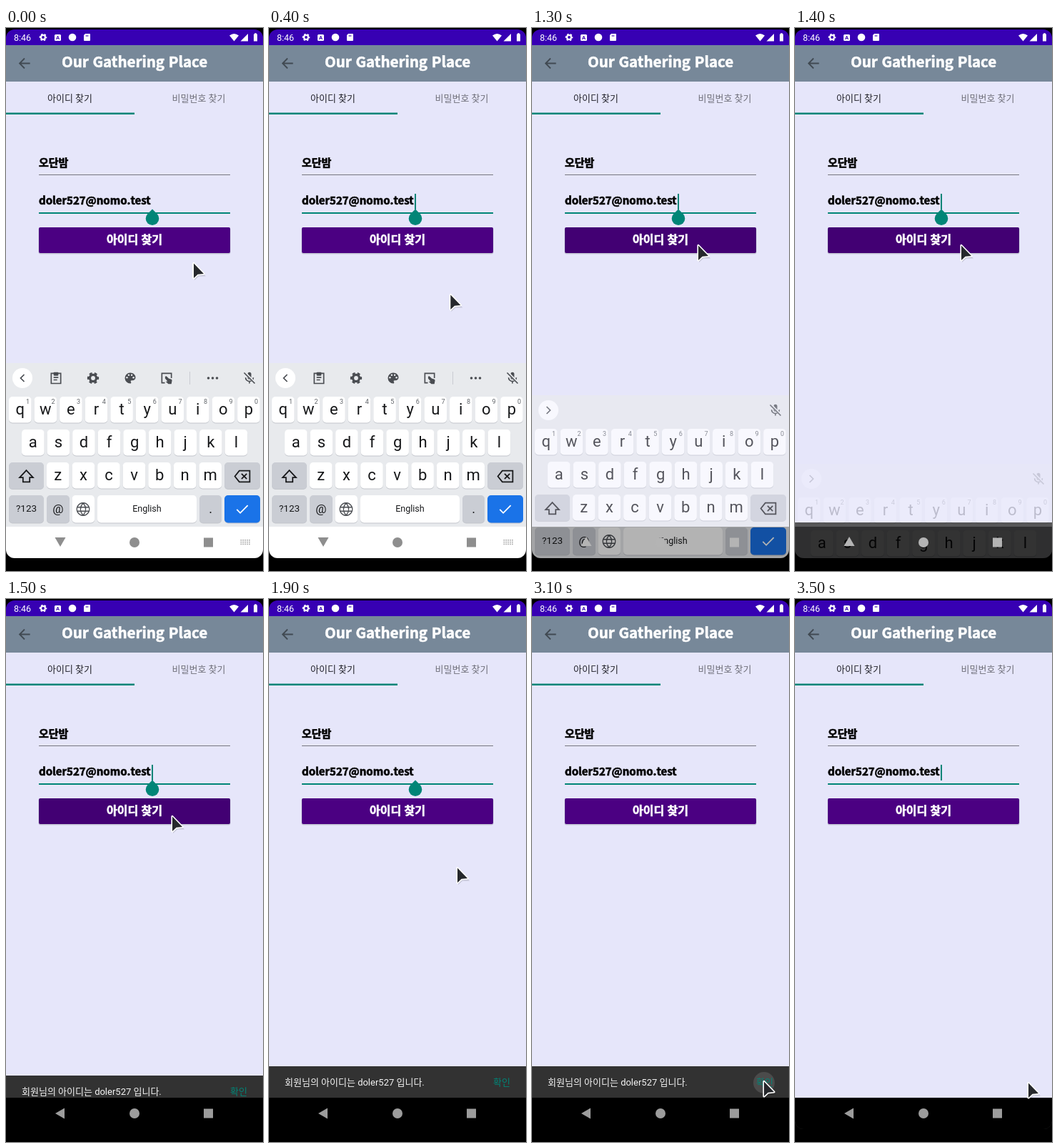
An HTML page for the animation above (3600 ms loop, 360x760 px).

```html
<!DOCTYPE html>
<html lang="ko">
<head>
<meta charset="utf-8">
<title>아이디 찾기</title>
<style>
html, body { margin: 0; width: 100%; height: 100%; overflow: hidden; background: #000; }
svg { display: block; width: 360px; height: 760px; }
text { font-family: Roboto, "Noto Sans CJK KR", "Noto Sans CJK", sans-serif; white-space: pre; }
.heavy { font-family: "Noto Sans CJK KR", "Noto Sans CJK", "Noto Sans", sans-serif; font-weight: 900; stroke-width: .6; }
</style>
</head>
<body>
<svg id="stage" viewBox="0 0 360 760" xmlns="http://www.w3.org/2000/svg"></svg>
<script>
const LOOP = 3600, STEP = 100;
const TEAL = '#018577', INK = '#17181a', ICON = '#4a4d52';

const rect = (x, y, w, h, fill, rest = '') =>
  `<rect x="${x}" y="${y}" width="${w}" height="${h}" fill="${fill}" ${rest}/>`;
const disc = (x, y, r, fill, rest = '') =>
  `<circle cx="${x}" cy="${y}" r="${r}" fill="${fill}" ${rest}/>`;
const text = (x, y, size, fill, str, rest = '') =>
  `<text x="${x}" y="${y}" font-size="${size}" fill="${fill}" ${rest}>${str}</text>`;
const MID = 'text-anchor="middle"';
const heavy = (x, y, size, fill, str, rest = '') =>
  text(x, y, size, fill, str, `class="heavy" stroke="${fill}" ${rest}`);

// Icons are drawn in a 24 unit box centred on x, y.
const icon = (x, y, size, body) =>
  `<g transform="translate(${x - size / 2} ${y - size / 2}) scale(${size / 24})">${body}</g>`;
const line = (d, color, width = 2) =>
  `<path d="${d}" fill="none" stroke="${color}" stroke-width="${width}"/>`;
const shape = (d, fill) => `<path d="${d}" fill="${fill}" fill-rule="evenodd"/>`;
const gear = c =>
  `<g fill="none" stroke="${c}"><circle cx="12" cy="12" r="5.500" stroke-width="4"/>
   <circle cx="12" cy="12" r="8.300" stroke-width="3" stroke-dasharray="4.800 3.890" stroke-dashoffset="2.400"/></g>`;

function statusBar() {
  return rect(0, 0, 360, 24, '#3700b3') +
    text(11, 17.5, 12.5, '#fff', '8:46') +
    icon(52, 13, 13, gear('#fff')) +
    rect(68, 9, 9, 9, '#fff', 'rx="1.5"') +
    text(72.5, 16.2, 7.5, '#3700b3', 'A', MID + ' font-weight="700"') +
    disc(93, 13, 5.3, '#fff') +
    shape('M111 8h6q1 0 1 1v8q0 1-1 1h-7q-1 0-1-1v-7zM112 10v2h1v-2zM114 10v2h1v-2z', '#fff') +
    shape('M313 10.5q6.500-5 13 0L319.500 18.500z', '#fff') +
    shape('M339 8v10.500h-10.500z', '#fff') +
    shape('M347 8.500h1.200v-1.200h2.600v1.200h1.200v10h-5z', '#fff');
}

function page() {
  return rect(0, 24, 360, 680, '#e6e6fa') +
    rect(0, 24, 360, 51, '#778899') +
    icon(26, 49.500, 23, line('M20 12H5M12 4.700 4.800 12 12 19.300', '#414a53')) +
    heavy(180, 55, 20.5, '#fff', 'Our Gathering Place', MID) +
    text(89.500, 103, 13, '#22222a', '아이디 찾기', MID) +
    text(270, 103, 13, '#70707b', '비밀번호 찾기', MID) +
    rect(0, 118.500, 180, 2.500, TEAL) +
    heavy(46, 193.500, 15, '#000', '오단밤') +
    rect(46, 205, 268, 1, '#77777f') +
    heavy(46, 247, 15, '#000', 'doler527@nomo.test') +
    rect(46, 258, 268, 2, TEAL) +
    rect(204, 232, 2, 22, TEAL, 'id="caret"') +
    `<g id="handle">${shape('M205 253.500 211.700 260.300A9.300 9.300 0 1 1 198.300 260.300z', TEAL)}</g>` +
    rect(45.500, 279, 269, 37.500, '#000', 'rx="3" opacity=".16"') +
    rect(46, 279, 268, 36, '#4b0082', 'rx="2" id="button"') +
    heavy(180, 301.500, 16, '#fff', '아이디 찾기', MID);
}

function snackbar() {
  return `<g id="snack">${rect(0, 654, 360, 44, '#323232')}
    ${disc(325, 677, 15, '#4b4b4b', 'id="ripple"')}
    ${text(22, 681, 13, '#f4f4f4', '회원님의 아이디는 doler527 입니다.')}
    ${text(326, 681, 13, TEAL, '확인', MID)}</g>`;
}

function key(x, y, w, h, fill, label = '', size = 22) {
  return rect(x, y + 1, w, h, '#c3c6cc', 'rx="5"') + rect(x, y, w, h, fill, 'rx="5"') +
    text(x + w / 2, y + h / 2 + size * 0.31, size, INK, label, MID);
}

function letters(row, x, y) {
  return [...row].map((c, i) => key(x + i * 35.57, y, 31.600, 36.500, '#fff', c)).join('');
}

function tools() {
  const c = ICON;
  return icon(70, 490, 20,
      line('M4 4h16v17H4zM8 11h8M8 15h6', c) + rect(8, 2, 8, 6, c, 'rx="1"')) +
    icon(122, 490, 20, gear(c)) +
    icon(174, 490, 20,
      shape('M12 3a9 9 0 0 0 0 18c1.500 0 2-1.500 1.200-2.500C12.200 17 13 16 14.500 16H16a5 5 0 0 0 5-5c0-4.500-4-8-9-8z', c) +
      [[6.500, 11], [9.500, 7], [14.500, 7], [17.500, 11]].map(p => disc(...p, 1.500, '#e8eaed')).join('')) +
    icon(225, 490, 20,
      line('M9 20H4V4h16v8', c) +
      shape('M9.500 9.500q1.500-1.500 3 0l3 3 4.500 1.500q1.500 1 1 2.500l-1 5.500h-5l-4.500-4 3-.5-4-5z', c)) +
    rect(257, 481, 1, 18, '#c9ccd2') +
    [283.500, 289.500, 295.500].map(x => disc(x, 490, 1.800, c)).join('');
}

function keyboard() {
  const gray = '#cacdd4', hints = '1234567890';
  return rect(0, 469, 360, 229, '#e8eaed') + rect(0, 698, 360, 44, '#fff') +
    disc(23, 490, 14, '#fff') +
    `<g id="chevron">${line('M25.500 485 20.500 490 25.500 495', ICON, 1.700)}</g>` +
    `<g id="tools">${tools()}</g>` +
    icon(341, 490, 20,
      rect(9, 2, 6, 12, ICON, 'rx="3"') + line('M5.500 11a6.500 6.500 0 0 0 13 0M12 17v4', ICON) +
      line('M4.500 3 21 20', '#e8eaed', 4) + line('M3 3 21 21', ICON)) +
    letters('qwertyuiop', 4, 516) +
    [...hints].map((n, i) => text(30.500 + i * 35.57, 526, 9, '#5f6368', n, MID)).join('') +
    letters('asdfghjkl', 22, 562) +
    key(4, 608, 49, 37, gray) +
    icon(28.500, 628, 25, line('M12 3.500 21 13h-4.500v6h-9v-6H3z', INK, 1.700)) +
    letters('zxcvbnm', 57, 608) +
    key(306, 608, 50, 37, gray) +
    icon(331, 627.500, 25, line('M8 4.500h14v15H8L2 12zM11 8.500l7 7M18 8.500l-7 7', INK, 1.700)) +
    key(4, 654, 49, 38.500, gray, '?123', 13.500) +
    key(57, 654, 32, 38.500, gray, '@', 17) +
    key(92.500, 654, 31.500, 38.500, '#fff') +
    icon(108, 673.500, 22,
      line('M12 2.500a9.500 9.500 0 1 0 .01 0M12 2.500q-8 9.500 0 19q8-9.500 0-19M3.500 9h17M3.500 15h17', ICON, 1.500)) +
    key(128, 654, 139, 38.500, '#fff', 'English', 12.500) +
    key(271, 654, 31, 38.500, gray, '.', 18) +
    key(306, 654, 50, 38.500, '#1a73e8') +
    icon(331, 673.500, 23, line('M4 12.500 9 17.500 20 6.500', '#fff', 1.900)) +
    '';
}

function navIcons() {
  const dots = [0, 1, 2].map(r => [0, 1, 2, 3, 4]
    .map(i => rect(328.500 + i * 2.900, 716 + r * 2.800, 1.700, 1.600, '#a8a8a8')).join('')).join('');
  return `<g id="nav" fill="#8e8e8e">
    <path id="back" d="M-7 0 6-7.500V7.500z"/>
    <circle cx="180" cy="720" r="7"/><rect x="277" y="713.500" width="13" height="13"/></g>
    <g id="switcher">${dots}</g>`;
}

const arrow = 'M1 1.500V22L6.600 16.800 15 16z';
const pointer = `<g id="pointer">
  <path d="M2 3V25L8 19.500H18z" opacity=".14"/>
  <path d="${arrow}" fill="#26282c" stroke="#fff" stroke-width="3.200" stroke-linejoin="round" paint-order="stroke"/></g>`;

document.getElementById('stage').innerHTML =
  `<defs><clipPath id="screen"><rect y="2" width="360" height="740" rx="12"/></clipPath></defs>
  <g clip-path="url(#screen)">${page()}${snackbar()}${rect(0, 698, 360, 62, '#000')}
  <g id="board">${keyboard()}</g>${statusBar()}${navIcons()}</g>${pointer}`;

const el = {};
document.querySelectorAll('[id]').forEach(n => el[n.id] = n);
const set = (name, attr, value) => el[name].setAttribute(attr, value);
const show = (name, on) => set(name, 'visibility', on ? 'visible' : 'hidden');

// Tracks are rows of time followed by values.
const path = [
  [0, 262, 328], [200, 263, 380], [300, 262, 403], [600, 236, 310], [800, 232, 303],
  [1500, 232, 303], [1900, 263, 375], [2400, 323, 651], [2600, 324, 674],
  [3100, 324, 674], [3500, 326, 676]
];
const slide = [[1200, 0, 1], [1300, 45, 0.7], [1400, 141, 0.2], [1500, 230, 0]];
const bar = [[1300, 44], [1400, 38], [1500, 13], [1600, 2], [1700, 0], [3200, 0], [3300, 12], [3400, 37], [3500, 44]];

function at(track, t) {
  const i = track.findIndex(row => row[0] > t);
  if (i < 0) return track[track.length - 1].slice(1);
  if (i === 0) return track[0].slice(1);
  const a = track[i - 1], b = track[i], k = (t - a[0]) / (b[0] - a[0]);
  return a.slice(1).map((v, j) => v + (b[j + 1] - v) * k);
}

function draw(t) {
  const [x, y] = at(path, t), [drop, alpha] = at(slide, t), [low] = at(bar, t);
  set('pointer', 'transform', `translate(${x} ${y})`);
  set('board', 'transform', `translate(0 ${drop})`);
  set('board', 'opacity', alpha);
  set('snack', 'transform', `translate(0 ${low})`);
  show('caret', t >= 300 && (t - 300) % 1000 < 500);
  show('handle', t < 2900);
  show('ripple', t >= 3000 && t < 3400);
  show('tools', t < 1300);
  show('switcher', t < 1300);
  set('chevron', 'transform', t < 1300 ? '' : 'translate(46 0) scale(-1 1)');
  set('button', 'fill', t >= 1200 && t < 1600 ? '#420073' : '#4b0082');
  const turn = t < 1300 ? -90 : t < 1500 ? 90 : 0;
  set('back', 'transform', `translate(76 ${turn ? 719 : 720}) rotate(${turn})`);
  set('nav', 'fill', t < 1300 ? '#8e8e8e' : t < 1500 ? '#b4b4b4' : '#9c9c9c');
}

const start = performance.now();
function tick() {
  const t = (performance.now() - start) % LOOP;
  draw(Math.floor(t / STEP) * STEP);
  requestAnimationFrame(tick);
}
tick();
</script>
</body>
</html>
```
